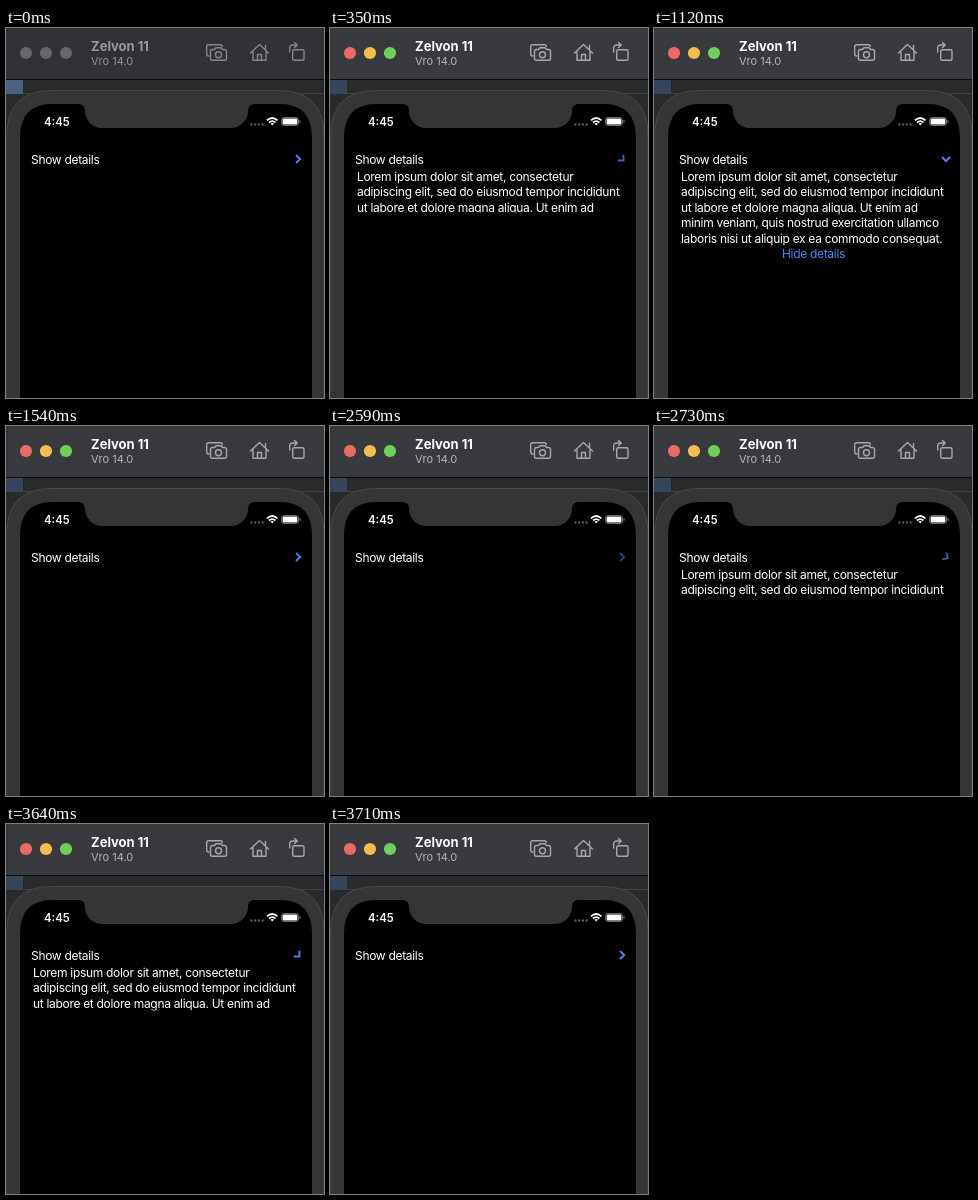
Write an HTML page that moves like this. It is 318 by 370 pixels and loops after 4.97 s.

```html
<!DOCTYPE html>
<html lang="en">
<head>
<meta charset="utf-8">
<title>Disclosure group</title>
<style>
  html, body { margin: 0; width: 100%; height: 100%; overflow: hidden; background: #000; }
  svg { display: block; width: 318px; height: 370px; font: 12px Inter, "Liberation Sans", sans-serif; }
  .body { letter-spacing: -.31px; fill: #fff; }
  .icon { fill: none; stroke: var(--icon); stroke-width: 1.4; stroke-linejoin: round; stroke-linecap: round; }
  #window { --bar: #393a3e; --title: #fff; --sub: #b4b4b6; --icon: #a6a7a9;
            --red: #ec6a66; --yellow: #f4bd4f; --green: #6fd05c; --desk: #35465a; }
  #window.inactive { --bar: #313235; --title: #98999b; --sub: #929395; --icon: #858688;
            --red: #656668; --yellow: #656668; --green: #656668; --desk: #48627f; }
</style>
</head>
<body>
<svg id="window" viewBox="0 0 318 370">
  <defs><clipPath id="reveal"><rect id="mask" x="20" y="141" width="280" height="0"/></clipPath></defs>

  <!-- desktop behind the window -->
  <rect width="318" height="370" fill="#292a2c"/>
  <rect y="52" width="17" height="14" fill="var(--desk)"/>
  <path d="M17 65.5H318" stroke="#414244"/>

  <!-- title bar -->
  <rect width="318" height="51" fill="var(--bar)"/>
  <path d="M0 51.5H318" stroke="#0c0c0d"/>
  <circle cx="20" cy="25" r="6.1" fill="var(--red)"/>
  <circle cx="40" cy="25" r="6.1" fill="var(--yellow)"/>
  <circle cx="60" cy="25" r="6.1" fill="var(--green)"/>
  <text x="85" y="23" font-size="13" font-weight="700" fill="var(--title)">Zelvon 11</text>
  <text x="85" y="37" font-size="11" fill="var(--sub)">Vro 14.0</text>
  <g class="icon">
    <path d="M203 28H202.500Q200.700 28 200.700 26V18.500Q200.700 16.700 202.500 16.700H214.500Q216.300 16.700 216.300 18.500"/>
    <path d="M206.500 21.500H208.500L210 19.700H215L216.500 21.500H218.500Q220.500 21.500 220.500 23.500V30.500Q220.500 32.300 218.500 32.300H206.500Q204.500 32.300 204.500 30.500V23.500Q204.500 21.500 206.500 21.500Z"/>
    <circle cx="212.500" cy="26.700" r="3"/>
    <path d="M244.500 25L253.500 16.500L262.500 25M247 23.500V32.300H260V23.500M259.500 21V17.500M251.500 32V26.500H255.500V32"/>
    <rect x="286.700" y="21.700" width="11.300" height="10.600" rx="1.500"/>
    <path d="M283.700 24V20Q283.700 17 287 17H291M288.500 14.500L291.300 17L288.500 19.500"/>
  </g>

  <!-- phone -->
  <path d="M.8 371V108Q.8 62.500 46 62.500H273Q318 62.500 318 108V371Z" fill="#353535" stroke="#484848"/>
  <path d="M14 370V110Q14 76 46 76H73Q79 76.500 79 83A17 17 0 0 0 96 100H225A17 17 0 0 0 242 83Q242 76.500 248 76H274Q306 76 306 110V370Z"/>

  <!-- status bar -->
  <text x="38" y="97.600" font-size="11.300" font-weight="600" fill="#fff">4:45</text>
  <path d="M245.500 96.500H257" stroke="#5c5c5c" stroke-width="2.400" stroke-linecap="round" stroke-dasharray="0 3.700"/>
  <g fill="none" stroke="#fff" stroke-width="1.700">
    <path d="M261 92.300Q266.200 87.700 271.400 92.300M263 94.500Q266.200 91.700 269.400 94.500"/>
    <path d="M264.400 95.600Q266.200 94.200 268 95.600L266.200 97.600Z" fill="#fff" stroke="none"/>
  </g>
  <rect x="275.500" y="89.500" width="17" height="8" rx="2.300" fill="none" stroke="#8a8a8a" stroke-width=".8"/>
  <rect x="276.600" y="90.500" width="14.800" height="6" rx="1.300" fill="#fff"/>
  <path d="M294 92.300V94.800" stroke="#8a8a8a"/>

  <!-- disclosure group -->
  <g class="body">
    <text x="25" y="135.500">Show details</text>
    <g clip-path="url(#reveal)">
      <text x="27" y="152.500">Lorem ipsum dolor sit amet, consectetur</text>
      <text x="27" y="168">adipiscing elit, sed do eiusmod tempor incididunt</text>
      <text x="27" y="183.500">ut labore et dolore magna aliqua. Ut enim ad</text>
      <text x="27" y="199">minim veniam, quis nostrud exercitation ullamco</text>
      <text x="27" y="214.500">laboris nisi ut aliquip ex ea commodo consequat.</text>
      <text x="159.500" y="229.500" text-anchor="middle" fill="#4b8bf0">Hide details</text>
    </g>
  </g>
  <path id="chevron" d="M-2 -4L2.200 0L-2 4" fill="none" stroke="#4c82f2" stroke-width="1.900"/>
</svg>
<script>
  const LOOP = 4970, TICK = 70, CONTENT_HEIGHT = 91;
  const [win, mask, chevron] = ['window', 'mask', 'chevron'].map(id => document.getElementById(id));

  const progress = (t, start, end) => Math.min(1, Math.max(0, (t - start) / (end - start)));
  const ease = (t, start, end) => {
    const p = progress(t, start, end);
    return p * p * (3 - 2 * p);
  };

  // The button dims on press and recovers while the group opens.
  const pressed = (t, press, start, end) => t < press ? 1 : 0.5 + 0.5 * ease(t, start, end);

  function draw(now) {
    const t = Math.floor((now % LOOP) / TICK) * TICK;
    const open = ease(t, 180, 530) - ease(t, 1120, 1540)
               + ease(t, 2590, 2940) - ease(t, 3570, 3710);
    const opacity = t < 2000 ? pressed(t, 140, 180, 530) : pressed(t, 2590, 2590, 2940);

    win.classList.toggle('inactive', t < 70);
    mask.setAttribute('height', CONTENT_HEIGHT * open);
    chevron.setAttribute('transform', `translate(292 131) rotate(${90 * open})`);
    chevron.setAttribute('opacity', opacity);
  }

  const begin = performance.now();
  function loop() {
    draw(performance.now() - begin);
    requestAnimationFrame(loop);
  }
  loop();
</script>
</body>
</html>
```
